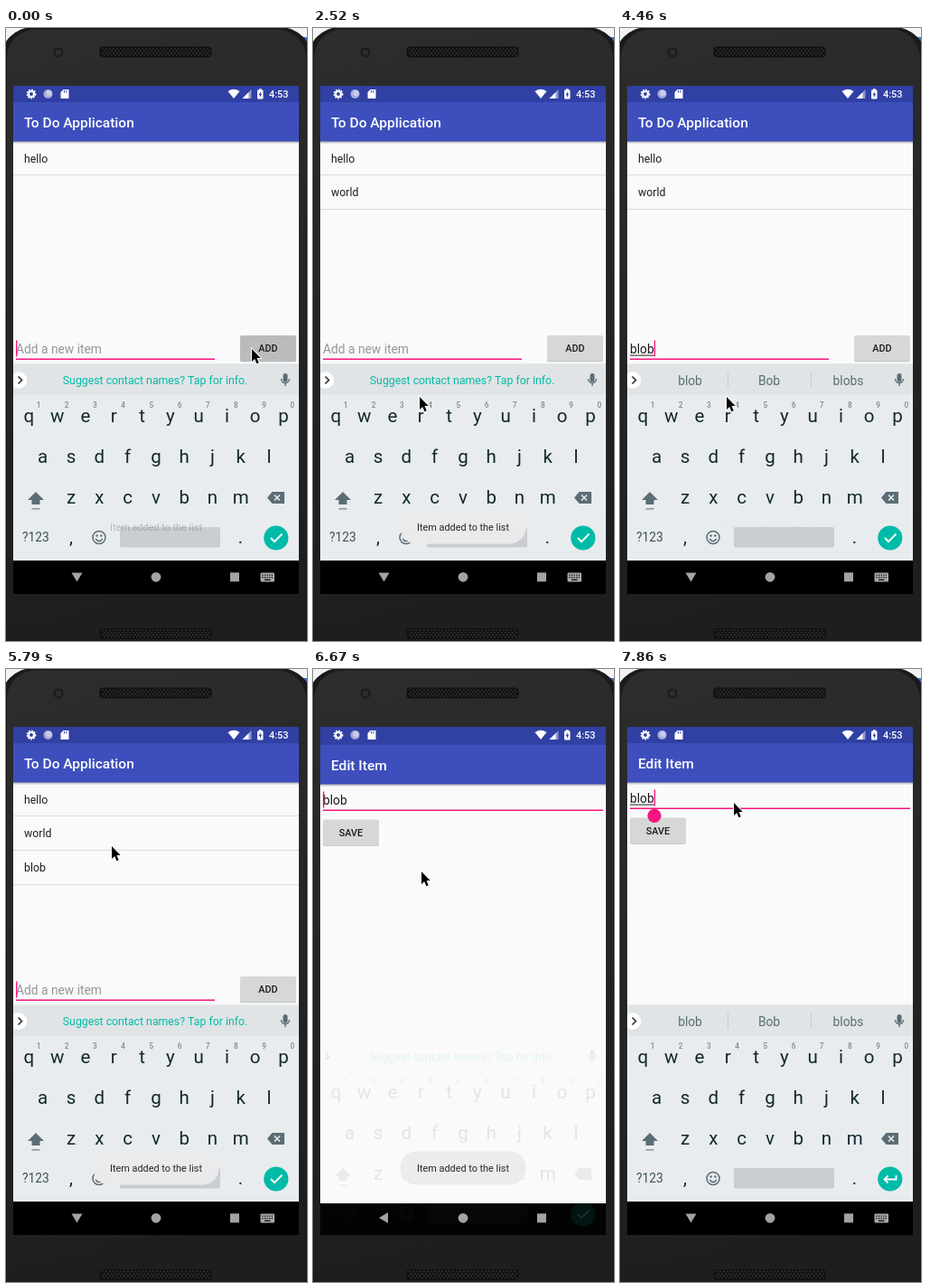
An HTML page with a canvas that plays this animation: 333 by 678 pixels, repeating every 8 s.

```html
<!DOCTYPE html>
<html lang="en">
<head>
<meta charset="utf-8">
<title>To do list</title>
<style>
html, body { margin: 0; width: 100%; height: 100%; overflow: hidden; background: #222; }
canvas { display: block; }
</style>
</head>
<body>
<canvas id="stage" width="333" height="678"></canvas>
<script>
const c = document.getElementById('stage').getContext('2d');
const LOOP = 8000, STEP = 148.3;
const PINK = '#f5167f', INK = '#12282e', SLATE = '#5b6d74', TEAL = '#00bba7';

// Each track is a list of [step, value]; hold keeps the last value, glide interpolates.
const TYPED = [[0, ''], [5, 'w'], [6, 'wor'], [7, 'world'], [12, ''], [27, 'b'], [28, 'bl'], [29, 'blo'], [30, 'blob'], [36, '']];
const CARET = [[0, 1], [3, 0], [5, 1], [17, 0], [20, 1], [24, 0], [27, 1], [41, 0], [45, 1], [48, 0], [50, 1]];
const POINTER = [[0, [272, 355]], [1, [257, 361]], [3, [196, 390]], [8, [196, 390]], [10, [272, 356]], [13, [272, 356]],
  [17, [118, 408]], [31, [118, 408]], [34, [276, 356]], [36, [276, 356]], [39, [117, 196]], [41, [120, 224]],
  [46, [120, 224]], [49, [126, 148]], [53, [126, 148]]];
const TOAST = [[0, [.25]], [1, [.7]], [2, [1]], [13, [1]], [15, [0]], [17, [1]], [28, [1]], [30, [.02]], [32, [0]],
  [35, [0]], [37, [1]], [47, [1]], [49, [0]]];
const KEYBOARD = [[0, [0, 1]], [44, [14, .6]], [45, [39, .1]], [46, [0, 0]], [51, [30, .6]], [52, [0, 1]]];
const WORDS = {
  w: ['we', 'with', 'was'], wor: ['work', 'world', 'word'], world: ['world', 'works', "world's"],
  b: ['b', 'be', 'but'], bl: ['bl', 'blue', 'black'], blo: ['blo', 'block', 'blow'], blob: ['blob', 'Bob', 'blobs']
};

const hold = (track, n) => track.filter(k => k[0] <= n).pop()[1];
function glide(track, n) {
  const i = track.findLastIndex(k => k[0] <= n), a = track[i], b = track[i + 1];
  if (!b) return a[1];
  const p = (n - a[0]) / (b[0] - a[0]);
  return a[1].map((v, j) => v + (b[1][j] - v) * p);
}

function box(x, y, w, h, color, r = 0) {
  c.fillStyle = color;
  c.beginPath();
  c.roundRect(x, y, w, h, r);
  c.fill();
}
function disc(x, y, r, color) {
  c.fillStyle = color;
  c.beginPath();
  c.arc(x, y, r, 0, 7);
  c.fill();
}
function shape(path, color, x = 0, y = 0, stroke = 0) {
  c.save();
  c.translate(x, y);
  c.fillStyle = c.strokeStyle = color;
  c.lineWidth = stroke;
  stroke ? c.stroke(new Path2D(path)) : c.fill(new Path2D(path));
  c.restore();
}
function text(s, x, y, size, color, align = 'left', weight = 400) {
  c.font = `${weight} ${size}px Roboto, sans-serif`;
  c.textAlign = align;
  c.fillStyle = color;
  c.fillText(s, x, y);
}
function layer(dy, alpha, draw) {
  c.save();
  c.translate(0, dy);
  c.globalAlpha = alpha;
  draw();
  c.restore();
}
function gradient(x, y, from, to) {
  const g = c.createLinearGradient(...x, ...y);
  g.addColorStop(0, from);
  g.addColorStop(1, to);
  return g;
}

function grille(y) {
  box(103.5, y, 124, 12, '#111', 4);
  for (let row = 0; row < 4; row++)
    for (let x = 106 + row % 2 * 2; x < 226; x += 4) box(x, y + 1.5 + row * 2.4, 1.8, 1.6, '#333');
}
function phone() {
  box(0, 0, 333, 678, '#f3f3f3');
  box(318, 10, 15, 8, '#3f6fc4');
  box(-6, -1, 345, 720, '#1a1a1a', 36);
  box(1, 1.5, 331, 710, gradient([0, 0], [160, 640], '#2d2d2d', '#1e1e1e'), 32);
  grille(20.5);
  grille(664);
  disc(58, 27, 5.5, '#1c1c1c');
  disc(58, 27, 3.2, '#2d2d2d');
}

function statusBar() {
  box(8, 64, 316, 24, '#3040a3');
  c.setLineDash([1.7, 1.2]);
  shape('M4.4 0A4.4 4.4 0 1 1-4.4 0A4.4 4.4 0 1 1 4.4 0', '#fff', 28, 73, 2);
  c.setLineDash([]);
  shape('M3 0A3 3 0 1 1-3 0A3 3 0 1 1 3 0', '#fff', 28, 73, 2.2);
  disc(46.5, 73, 5, '#a4abda');
  disc(47.5, 72, 3.2, '#c8ccea');
  shape('M-1.5-5H4.5V5H-4.5V-2Z', '#fff', 65, 73);
  box(64, 69, 1, 2.5, '#3040a3');
  box(66.3, 69, 1, 2.5, '#3040a3');
  shape('M-6.5-3Q0-7.5 6.5-3L0 5Z', '#fff', 252, 73);
  shape('M5-5V5H-5Z', '#8f98cf', 266.5, 73);
  shape('M2-2V5H-5Z', '#fff', 266.5, 73);
  box(278, 68.5, 6.5, 10, '#fff', 1);
  box(279.8, 67.3, 3, 2, '#fff');
  shape('M.7-3.5L-1.8.7H-.2V3.5L1.9-.7H.4Z', '#3040a3', 281.2, 73.5);
  text('4:53', 291, 77, 10.9, '#fff', 'left', 500);
}
function appBar(title) {
  box(8, 125, 316, 4, gradient([0, 125], [0, 128.5], '#0005', '#0000'));
  box(8, 82, 316, 43.5, '#3e4fbd');
  text(title, 20, 110, 15.5, '#fff', 'left', 500);
}
function button(label, x, y, pressed) {
  box(x, y + .6, 62, 28.6, '#b9baba', 2);
  box(x, y, 62, 28.4, pressed ? '#babcbb' : '#d6d7d7', 2);
  text(label, x + 31, y + 18, 10.8, '#1c1c1c', 'center', 500);
}
function field(value, hint, baseline, width, caretOn, atEnd, composing) {
  text(value || hint, 11, baseline, 13.8, value ? '#1d1d1d' : '#959595');
  const w = c.measureText(value).width;
  if (value && composing) box(11, baseline + 1.6, w, 1, '#222');
  box(11, baseline + 5.5, width, 1.5, PINK);
  if (caretOn) box(11 + (atEnd ? w : 0), baseline - 14.5, 1.4, 18, PINK);
}

function listScreen(n) {
  const typed = hold(TYPED, n);
  const items = ['hello'];
  if (n >= 12) items.push('world');
  if (n >= 36) items.push('blob');
  box(8, 84, 316, 505, '#fafafa');
  if (n >= 43) box(8, 201, 316, 37, '#dedede');
  items.forEach((item, i) => {
    text(item, 20, 148.6 + i * 37.8, 12.3, '#1d1d1d');
    box(8, 162 + i * 38, 316, 1, '#dadada');
  });
  appBar('To Do Application');
  field(typed, 'Add a new item', 360, 220, hold(CARET, n), true, true);
  button('ADD', 259, 340, n === 0 || n === 11 || n === 35);
}
function editScreen(n) {
  box(8, 84, 316, 505, '#fafafa');
  appBar('Edit Item');
  button('SAVE', 11, 164.5);
  field('blob', '', 148, 310, hold(CARET, n), n >= 50, n >= 52);
  if (n >= 50) {
    disc(38, 162.3, 7.6, PINK);
    shape('M0-8.5L6-3H-6Z', PINK, 38, 162.3);
  }
}

function keyRow(letters, x, y) {
  [...letters].forEach((k, i) => text(k, x + i * 31.3, y, 20.5, INK, 'center'));
}
function keyPanels() {
  box(8, 371.5, 316, 217.5, '#e8ecef');
  box(8, 371.5, 316, 34, '#e0e4e6');
  disc(14, 389.5, 9.3, '#fff');
  box(126, 552, 111, 22.5, '#c9cdd0', 2);
}
function keyboard(words, returnKey) {
  shape('M-2-4L2 0L-2 4', '#333', 15.5, 389.5, 1.7);
  if (words) {
    words.forEach((w, i) => text(w, 77.5 + i * 87.5, 394.5, 13.8, SLATE, 'center'));
    box(119, 380, 1, 18, '#c6cccf');
    box(211, 380, 1, 18, '#c6cccf');
  } else {
    text('Suggest contact names? Tap for info.', 165, 394, 12.3, TEAL, 'center');
  }
  box(306.5, 382, 5, 9.5, SLATE, 2.5);
  shape('M-4.5-1A4.5 4.5 0 0 0 4.5-1M0 3.5V7', SLATE, 309, 389, 1.4);

  keyRow('qwertyuiop', 25.3, 435.5);
  [...'1234567890'].forEach((d, i) => text(d, 36 + i * 31.2, 420, 8.2, '#7d8a90', 'center', 500));
  keyRow('asdfghjkl', 40.7, 480.5);
  keyRow('zxcvbnm', 72, 526);
  shape('M0-7L9 2H4.5V7H-4.5V2H-9Z', SLATE, 33, 520);
  box(28.5, 531, 9, 1.6, '#8c999e');
  shape('M-10 0L-4.5-6.5H9V6.5H-4.5Z', SLATE, 299, 519.5);
  shape('M-2-3L4 3M4-3L-2 3', '#e8ecef', 299, 519.5, 1.6);

  text('?123', 18, 568, 13.8, '#3c4f56');
  text(',', 72, 570, 20, INK, 'center');
  text('.', 259.5, 570, 20, INK, 'center');
  shape('M7 0A7 7 0 1 1-7 0A7 7 0 1 1 7 0M-3.8 1.5Q0 6.5 3.8 1.5', SLATE, 103, 563.5, 1.5);
  disc(100.6, 561.5, 1.2, SLATE);
  disc(105.4, 561.5, 1.2, SLATE);
  disc(298.8, 564, 13.6, TEAL);
  if (returnKey) shape('M6.5-4V.5H-6M-2.5-3.5L-6.5.5L-2.5 4.5', '#fff', 299, 564, 1.8);
  else shape('M-6 0L-2 4.2L6.5-4.5', '#fff', 299, 564, 1.9);
}

function navIcons(open) {
  shape(open ? 'M-6-4.5H6L0 5.5Z' : 'M4.5-6V6L-5.5 0Z', '#a3a3a3', 78.5, 607);
  disc(166, 607.3, 5.4, '#a3a3a3');
  box(248, 602.3, 10, 10, '#a3a3a3');
  if (!open) return;
  box(281.5, 602.5, 15.5, 10, '#a9a9a9', 1);
  for (let i = 0; i < 10; i++) box(283.3 + i % 5 * 2.6, 604.5 + (i / 5 | 0) * 2.5, 1.3, 1.3, '#000');
  box(286, 609.7, 6.5, 1.2, '#000');
}
function toast(alpha) {
  // The pill lags behind its label while fading.
  layer(0, alpha ** 3 * .97, () => box(96.5, 533.5, 139, 37, '#ececed', 18));
  layer(0, alpha, () => text('Item added to the list', 166, 556, 10.86, '#262626', 'center'));
}
function pointer(x, y) {
  const arrow = 'M0 0V14L3.2 11L5.4 16.2L7.7 15.2L5.5 10.1H9.7Z';
  shape(arrow, '#fff', x, y, 1.8);
  shape(arrow, '#000', x, y);
}

function draw(ms) {
  const n = Math.floor((ms + 12) / STEP);
  const editing = n >= 44;
  const open = n < 45 || n >= 51;
  phone();
  c.save();
  c.beginPath();
  c.rect(8, 64, 316, 562);
  c.clip();
  box(8, 589, 316, 37, '#000');
  statusBar();
  if (n < 45) listScreen(n);
  if (editing) {
    const rise = n === 44 ? 26 : n === 45 ? 2 : 0;
    layer(rise, n === 44 ? .7 : 1, () => editScreen(n));
  }
  const words = editing ? n >= 53 && WORDS.blob : WORDS[hold(TYPED, n)];
  const [slide, alpha] = hold(KEYBOARD, n);
  layer(slide, alpha ** 2, keyPanels);
  layer(slide, alpha, () => keyboard(words, n >= 51));
  navIcons(open);
  toast(glide(TOAST, n)[0]);
  c.restore();
  pointer(...glide(POINTER, n));
}

function tick() {
  draw(performance.now() % LOOP);
  requestAnimationFrame(tick);
}
tick();
</script>
</body>
</html>
```
